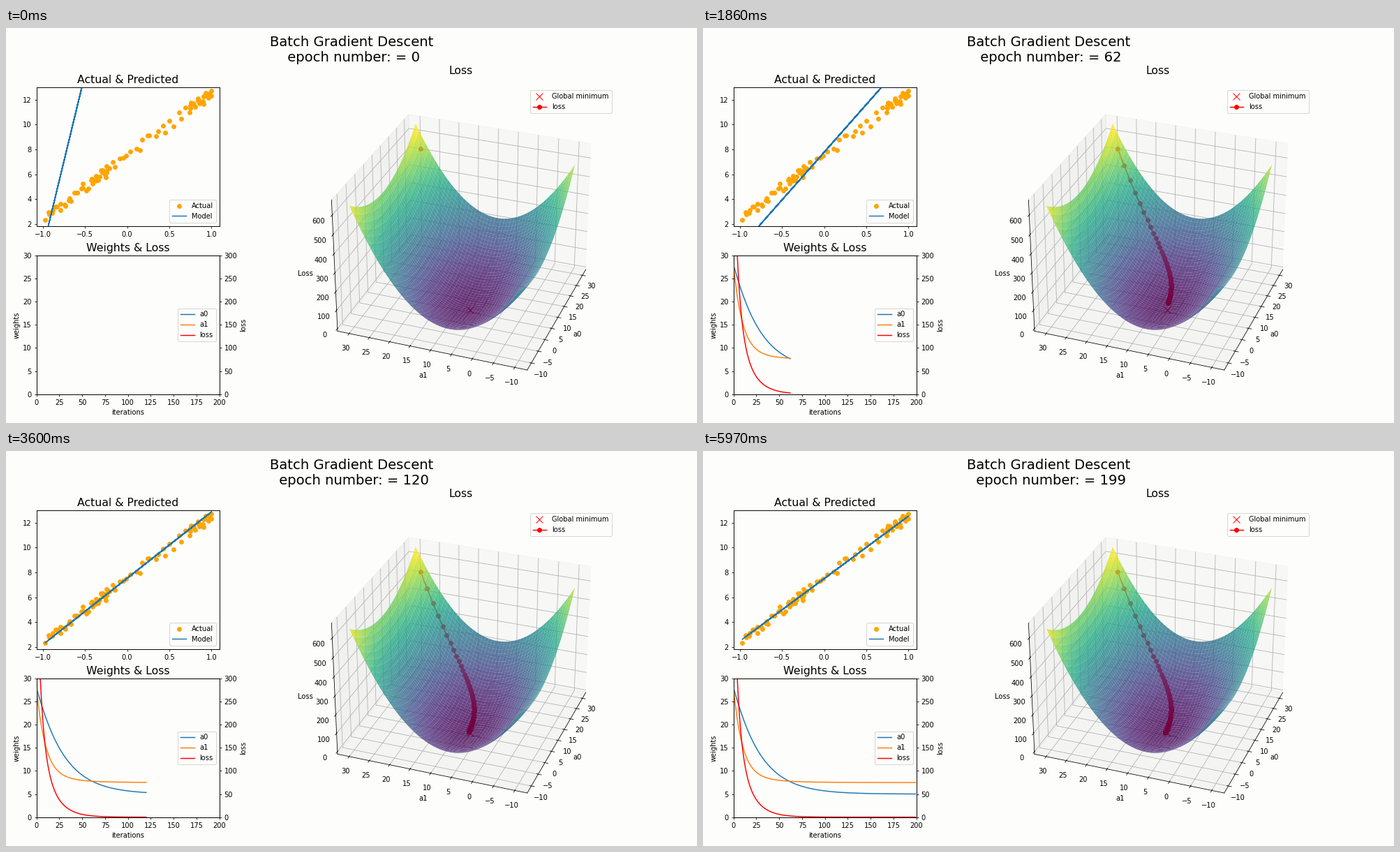
A matplotlib script for the animation above (6 s loop, 990 by 566 pixels).

```python
import matplotlib.pyplot as plt
import numpy as np
from matplotlib.animation import FuncAnimation
from matplotlib.lines import Line2D
from mpl_toolkits.mplot3d import proj3d

W, H, DPI = 990, 566, 70.75
EPOCHS, INTERVAL = 200, 30
RATE = 0.05
PAPER = '#fdfdfc'

# Least-squares optimum and moments of x define the quadratic loss.
BEST = np.array([5.0, 7.5])
MEAN_X, MEAN_X2, NOISE = -0.06, 0.358, 0.1

FIT = dict(box=(43.7, 85, 262, 198.7), xlim=(-1.073, 1.0926), ylim=(1.86, 12.98))
WEIGHTS = dict(box=(43.7, 326, 262, 198.7), xlim=(0, 200), ylim=(0, 30))
CUBE = (432, 84.5, 440.5, 440.5)


def make_data():
    """Noisy line, dense near both ends and around x = -0.3."""
    rng = np.random.default_rng(4)
    spans = ((-0.97, -0.42, 24), (-0.4, -0.22, 18), (-0.18, 0.69, 20), (0.72, 1, 20))
    x = np.concatenate([np.linspace(*span) for span in spans])
    x[1:-1] += rng.uniform(-0.02, 0.02, x.size - 2)
    y = BEST[0] * x + BEST[1] + rng.uniform(-0.45, 0.45, x.size)
    y[[0, -1]] = 2.35, 12.3
    return rng.permutation(np.column_stack([x, y])).T


def loss(a0, a1):
    e0, e1 = a0 - BEST[0], a1 - BEST[1]
    return MEAN_X2 * e0**2 + 2 * MEAN_X * e0 * e1 + e1**2 + NOISE


def descend(start):
    hess = np.array([[MEAN_X2, MEAN_X], [MEAN_X, 1]])
    steps = [np.array(start, float)]
    for _ in range(EPOCHS - 1):
        a = steps[-1]
        steps.append(a - 2 * RATE * hess @ (a - BEST))
    return np.array(steps).T


def add_axes(box, **kw):
    x, top, w, h = box
    return fig.add_axes([x / W, 1 - (top + h) / H, w / W, h / H], **kw)


def panel(box, xlim, ylim):
    ax = add_axes(box)
    ax.set(xlim=xlim, ylim=ylim)
    return ax


def overlay_panel(spec):
    ax = panel(**spec)
    ax.set(xticks=[], yticks=[])
    ax.patch.set_visible(False)
    return ax


def snapshot():
    fig.canvas.draw()
    return np.asarray(fig.canvas.buffer_rgba()).copy()


def draw_panels():
    ax = panel(**FIT)
    ax.set_title('Actual & Predicted', fontsize=16)
    ax.scatter(X, Y, color='orange', label='Actual')
    ax.plot([], [], label='Model')
    ax.legend(loc='lower right')
    ax.set(xlim=FIT['xlim'], ylim=FIT['ylim'])

    ax = panel(**WEIGHTS)
    ax.set_title('Weights & Loss', fontsize=16)
    ax.set(xlabel='iterations', ylabel='weights')
    twin = ax.twinx()
    twin.set(ylim=(0, 300), ylabel='loss')
    handles = [Line2D([], [], color=c, label=s)
               for c, s in (('C0', 'a0'), ('C1', 'a1'), ('red', 'loss'))]
    twin.legend(handles=handles, loc='center right')


def draw_cube():
    ax = add_axes(CUBE, projection='3d')
    ax.patch.set_visible(False)
    ax.view_init(elev=30, azim=200)
    side = np.linspace(-10, 30, 50)
    a0, a1 = np.meshgrid(side, side)
    z = loss(a0, a1)
    surf = ax.plot_surface(a0, a1, z, cmap='viridis', alpha=0.8)
    low, = ax.plot([5], [7], [0], 'rx', ms=10, label='Global minimum')
    pad = z.max() / 48
    ax.set(xlim=(-12.917, 32.917), ylim=(-12.917, 32.917),
           zlim=(-pad, z.max() + pad),
           xticks=range(-10, 31, 5), yticks=range(-10, 31, 5),
           zticks=range(0, 601, 100),
           xlabel='a0', ylabel='a1', zlabel='Loss')
    path = Line2D([], [], color='red', marker='o', label='loss')
    ax.legend(handles=[low, path], loc='upper right')
    return ax, surf, low


X, Y = make_data()
A0, A1 = descend((28, 28))
L = loss(A0, A1)

plt.rcParams.update({'figure.facecolor': PAPER, 'axes.facecolor': PAPER})
fig = plt.figure(figsize=(13.993, 8), dpi=DPI)
draw_panels()
cube, surf, low = draw_cube()
title = fig.text(652 / W, 1 - 66 / H, 'Loss', fontsize=16, ha='center')

# The still layers are rendered once: backdrop below the path, surface above it.
surf.set_visible(False)
backdrop = snapshot()

px, py, _ = proj3d.proj_transform(A0, A1, L, cube.get_proj())
path_xy = cube.transData.transform(np.column_stack([px, py])).T

for ax in fig.axes:
    ax.set_visible(ax is cube)
cube.set_axis_off()
cube.get_legend().remove()
low.remove()
title.remove()
surf.set_visible(True)
fig.patch.set_alpha(0)
surface = snapshot()

fig.clear()
fig.patch.set_alpha(1)
fig.figimage(backdrop, origin='upper', zorder=-1)
fig.figimage(surface, origin='upper', zorder=5)
heading = fig.suptitle('', fontsize=20)

fit_ax = overlay_panel(FIT)
model, = fit_ax.plot([], [], color='C0')
weight_ax = overlay_panel(WEIGHTS)
curves = [weight_ax.plot([], [], color=c)[0] for c in ('C0', 'C1', 'red')]
stage = panel((0, 0, W, H), (0, W), (0, H))
stage.axis('off')
path, = stage.plot([], [], 'ro-')


def update(n):
    heading.set_text(f'Batch Gradient Descent\n epoch number: = {n}')
    model.set_data(X, A0[n] * X + A1[n])
    done = slice(0, n + 1)
    for curve, values in zip(curves, (A0, A1, L / 10)):
        curve.set_data(np.arange(n + 1), values[done])
    path.set_data(path_xy[0][done], path_xy[1][done])
    return [heading, model, path, *curves]


anim = FuncAnimation(fig, update, frames=EPOCHS, interval=INTERVAL, repeat=True)
plt.show()
```
